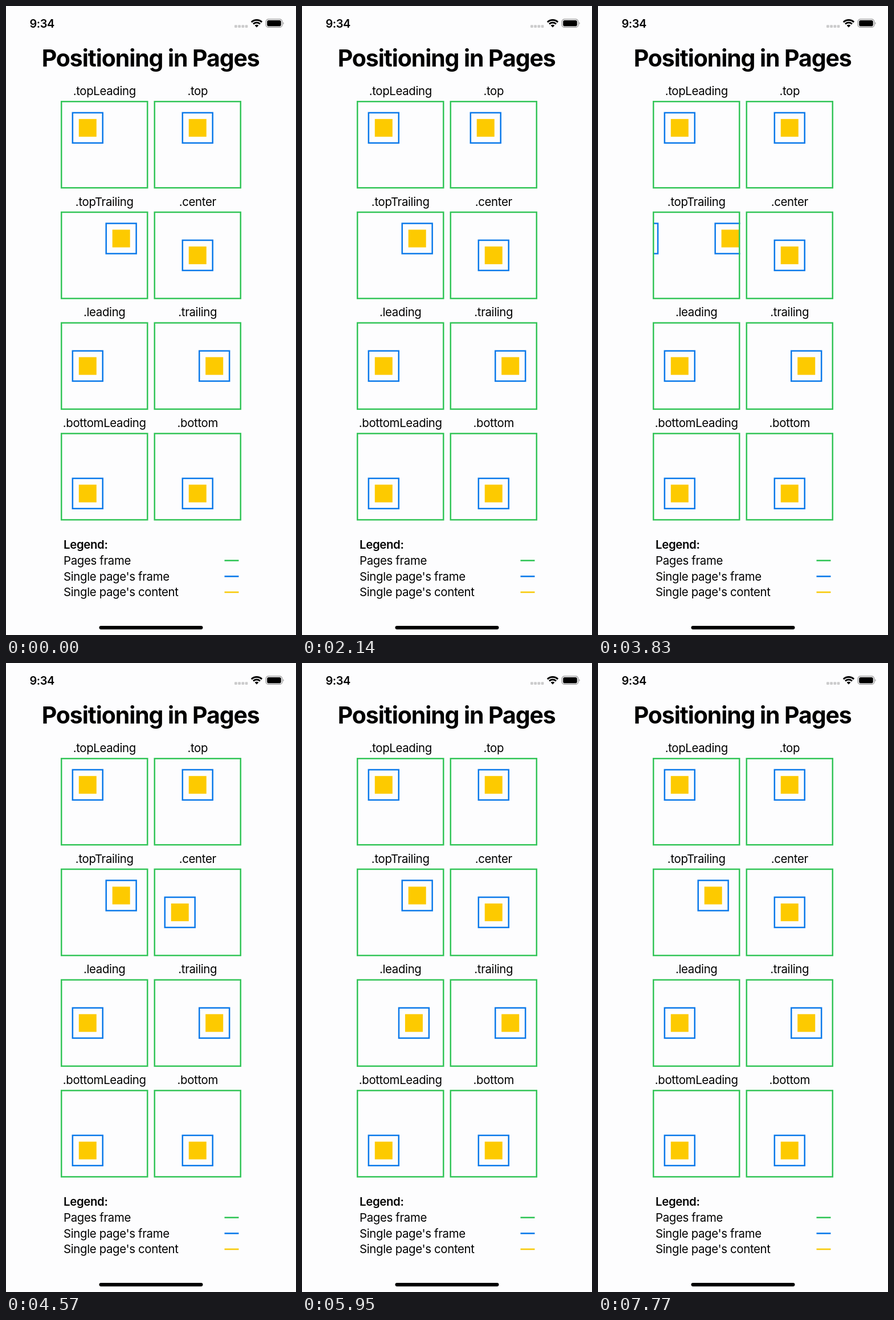
An HTML page that plays this animation: 509x1101 px, repeating every 8000 ms.

```html
<!DOCTYPE html>
<html lang="en">
<head>
<meta charset="utf-8">
<title>Positioning in Pages</title>
<style>
  html, body { margin: 0; width: 100%; height: 100%; overflow: hidden; background: #fdfdfe; }
  svg { display: block; width: 509px; height: 1101px; }
  text { font: 400 20.4px Inter, "Open Sans", sans-serif; letter-spacing: -.35px; font-optical-sizing: none; }
  .mid { text-anchor: middle; }
  .semi { font-weight: 600; }
  .title { font-size: 41px; font-weight: 700; letter-spacing: -1.1px; }
  .clock { font-size: 20px; letter-spacing: -.5px; }
</style>
</head>
<body>
<svg id="stage" viewBox="0 0 509 1101" xmlns="http://www.w3.org/2000/svg">
  <text class="semi clock" x="41.5" y="37.6">9:34</text>
  <g id="dots" fill="#cbcbcc"></g>
  <g id="wifi" fill="none" stroke="#000"></g>
  <rect x="456.2" y="23.2" width="28.6" height="14.2" rx="4.4" fill="none" stroke="#8f8f90" stroke-width="1.2"/>
  <rect x="458.2" y="25.1" width="24.6" height="10.4" rx="2.8"/>
  <path d="M486.4 27.8q2.4 2.5 0 5z" fill="#8f8f90"/>
  <text class="title mid" x="253.7" y="106">Positioning in Pages</text>
  <g id="grid"></g>
  <g id="legend"></g>
  <rect x="163.5" y="1085" width="182" height="6.2" rx="3.1"/>
</svg>
<script>
const GREEN = '#33c558', BLUE = '#0a79ea', YELLOW = '#fdca00';
const SIDE = 153.5, BOX = 55.4, FILL = 31, PAD = 19.6, LINE = 2.5;
const LOOP = 8000, SNAP = 350;
const $ = id => document.getElementById(id);

function add(parent, tag, attrs, text) {
  const el = document.createElementNS('http://www.w3.org/2000/svg', tag);
  for (const k in attrs) el.setAttribute(k, attrs[k]);
  if (text) el.textContent = text;
  return parent.appendChild(el);
}

function outline(parent, x, y, size, color) {
  add(parent, 'rect', {
    x: x + LINE / 2, y: y + LINE / 2, width: size - LINE, height: size - LINE,
    fill: 'none', stroke: color, 'stroke-width': LINE
  });
}

// Status bar
for (let i = 0; i < 4; i++) add($('dots'), 'rect', { x: 401 + i * 6.2, y: 33.2, width: 4.8, height: 4.8, rx: 1.2 });
function arc(r, width) {
  const d = r * Math.SQRT1_2;
  add($('wifi'), 'path', { d: `M${440 - d} ${37.5 - d}A${r} ${r} 0 0 1 ${440 + d} ${37.5 - d}`, 'stroke-width': width });
}
arc(13, 2.8);
arc(8.5, 2.8);
add($('wifi'), 'path', { d: 'M440 37.5L436.6 34.1A4.8 4.8 0 0 1 443.4 34.1Z', fill: '#000', stroke: 'none' });

// Cells: name, horizontal and vertical alignment (0 start, .5 middle, 1 end)
const cells = [
  ['topLeading', 0, 0], ['top', .5, 0],
  ['topTrailing', 1, 0], ['center', .5, .5],
  ['leading', 0, .5], ['trailing', 1, .5],
  ['bottomLeading', 0, 1], ['bottom', .5, 1]
];
const room = SIDE - BOX - 2 * PAD;
const strips = cells.map(([name, ax, ay], i) => {
  const x = 96 + i % 2 * 163.5, y = 166 + (i >> 1) * 193.7;
  const g = add($('grid'), 'g', {});
  add(g, 'text', { x: x + SIDE / 2, y: y - 10.2, class: 'mid' }, '.' + name);
  const clip = add(g, 'clipPath', { id: 'clip' + i });
  add(clip, 'rect', { x, y, width: SIDE, height: SIDE });
  const strip = add(add(g, 'g', { 'clip-path': `url(#clip${i})` }), 'g', {});
  for (const page of [0, 1]) {
    const bx = x + PAD + ax * room + page * SIDE, by = y + PAD + ay * room, inset = (BOX - FILL) / 2;
    outline(strip, bx, by, BOX, BLUE);
    add(strip, 'rect', { x: bx + inset, y: by + inset, width: FILL, height: FILL, fill: YELLOW });
  }
  outline(g, x, y, SIDE, GREEN);
  return strip;
});

// Legend
add($('legend'), 'text', { x: 101, y: 950, class: 'semi' }, 'Legend:');
[['Pages frame', GREEN], ["Single page's frame", BLUE], ["Single page's content", '#f8ca0a']].forEach(([label, color], i) => {
  const y = 977.8 + i * 27.7;
  add($('legend'), 'text', { x: 101, y }, label);
  add($('legend'), 'rect', { x: 383.5, y: y - 8.4, width: 25, height: 2.6, fill: color });
});

// One swipe per cell: start, duration, steps, first drag offset, offset at release
const swipes = [
  [500, 730, 18, 13, 78.2],
  [2140, 650, 16, 14, 92],
  [3350, 700, 17, 12.2, 88],
  [4440, 690, 17, 13, 89.7],
  [5690, 610, 15, 13, 100],
  [7080, 690, 17, 13, 89]
];

function offset(time, [start, length, steps, first, release]) {
  const t = time - start;
  if (t < 0 || t >= length) return 0;
  const gap = length / (steps - 1);
  const now = Math.floor(t / gap + .1) * gap;
  const drag = length - SNAP;
  if (now < drag) return first + (release - first) * (now / drag) ** 1.5;
  const left = Math.max(0, 1 - (now - drag) / SNAP);
  return SIDE - (SIDE - release) * left ** 1.667;
}

const origin = performance.now();
function draw() {
  const time = Math.max(0, performance.now() - origin) % LOOP;
  swipes.forEach((s, i) => strips[i].setAttribute('transform', `translate(${-offset(time, s)} 0)`));
  requestAnimationFrame(draw);
}
draw();
</script>
</body>
</html>
```
